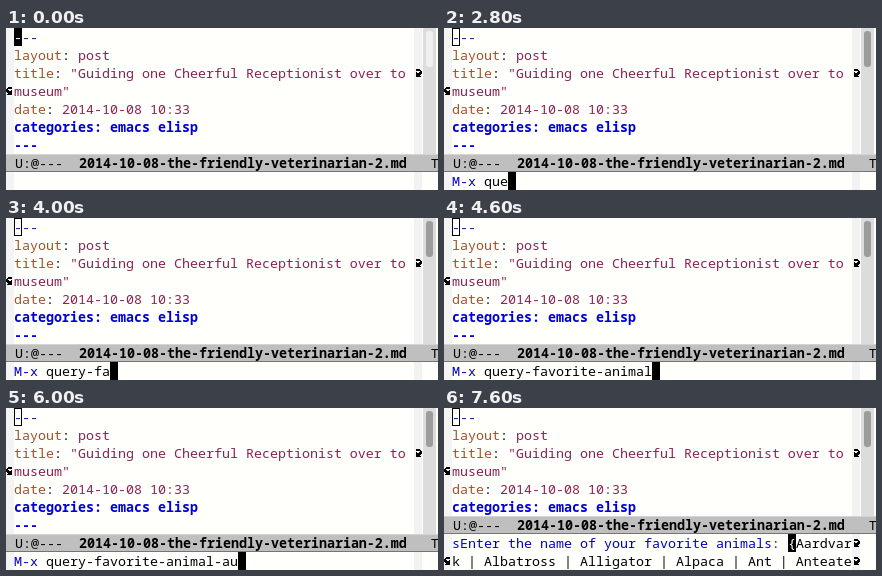
These frames come from a looping animation (432 px wide and 162 px high, 8 s). An HTML page:

```html
<!DOCTYPE html>
<html lang="en">
<head>
<meta charset="utf-8">
<title>Editor command prompt</title>
<style>
  html, body { margin: 0; width: 100%; height: 100%; overflow: hidden; background: #fff; }
  #stage {
    position: relative; width: 432px; height: 162px; overflow: hidden; color: #000;
    font: 13.3333px/18px "Noto Sans Mono", "DejaVu Sans Mono", monospace;
    font-variant-ligatures: none;
  }
  /* white paper with a grey fringe on either side */
  #stage, #panel {
    background: linear-gradient(90deg, #f4f4f4 8px, #fffffc 8px 408px, #f2f2f2 408px 416px, #fffffc 416px);
  }
  #stage > *, .row, svg { position: absolute; }
  .row { left: 8px; height: 18px; white-space: pre; }
  .track { left: 417px; top: 0; width: 13px; height: 126px; background: #dcdcdc; }
  #thumb { left: 420px; top: 3px; width: 7px; height: 36px; border-radius: 3px; background: #9c9c9c; }
  #thumb.light { background: #f0f0f0; }
  .key { color: #a0522d; }
  .str { color: #8b2252; }
  .head { color: #0000d8; font-weight: bold; }
  .rule { color: #16168c; }
  .prompt { color: #0000cd; }
  .cursor { display: inline-block; width: 8px; height: 18px; background: #000; color: #fff; vertical-align: top; }
  .cursor.hollow { background: none; color: inherit; box-shadow: inset 0 0 0 1px #000; }
  #panel { left: 0; top: 126px; width: 432px; height: 54px; }
  #mode {
    left: 0; width: 432px; box-sizing: border-box; padding-left: 9px; overflow: hidden;
    background: #bfbfbf; box-shadow: inset 0 1px #d4d4d4, inset 0 -1px #757575;
  }
  svg { width: 8px; height: 8px; }
  .back { left: 0; transform: scaleX(-1); }
  .wrap { left: 408px; }
  [hidden] { display: none; }
</style>
</head>
<body>
<div id="stage">
  <div class="track"></div>
  <div id="thumb"></div>

  <div class="row rule" style="top:0"><span id="point" class="cursor">-</span>--</div>
  <div class="row" style="top:18px"><span class="key">layout</span>: <span class="str">post</span></div>
  <div class="row" style="top:36px"><span class="key">title</span>: <span class="str">"Guiding one Cheerful Receptionist over to</span></div>
  <div class="row str" style="top:54px">museum"</div>
  <div class="row" style="top:72px"><span class="key">date</span>: <span class="str">2014-10-08 10:33</span></div>
  <div class="row head" style="top:90px">categories: emacs elisp</div>
  <div class="row head" style="top:108px">---</div>
  <svg class="wrap" style="top:41px"><path id="curl" d="M2 0h4v1h1v1h1v3h-1v1h-1v1h1v1H2V3h1v1h2V3h1V2H2z"/></svg>
  <svg class="back" style="top:59px"><use href="#curl"/></svg>

  <div id="panel">
    <div id="mode" class="row">U:@---  <b>2014-10-08-the-friendly-veterinarian-2.md</b>   T</div>
    <div id="command" class="row" style="top:18px"><span class="prompt">M-x </span><span id="typed"></span><span class="cursor"></span></div>
    <div id="question">
      <div class="row" style="top:18px"><span class="prompt">sEnter the name of your favorite animals: </span><span class="cursor">{</span>Aardvar</div>
      <div class="row" style="top:36px">k | Albatross | Alligator | Alpaca | Ant | Anteate</div>
      <svg class="wrap" style="top:23px"><use href="#curl"/></svg>
      <svg class="wrap" style="top:41px"><use href="#curl"/></svg>
      <svg class="back" style="top:41px"><use href="#curl"/></svg>
    </div>
  </div>
</div>
<script>
  const LOOP = 8000, OPEN = 2000, ASK = 7600;
  const COMMAND = "query-favorite-animal-autocomplete";
  // [time in ms, characters typed]
  const KEYS = [
    [2400, 1], [2600, 2], [2800, 3], [3000, 4], [3200, 5], [3400, 6], [3600, 7],
    [4000, 8], [4200, 9], [4400, 10], [4600, 21], [5400, 22], [5800, 23],
    [6000, 24], [6200, 25], [6800, COMMAND.length]
  ];
  const $ = id => document.getElementById(id);
  const [thumb, point, panel, command, typed, question] =
    ["thumb", "point", "panel", "command", "typed", "question"].map($);

  function draw(t) {
    const asking = t >= ASK;
    const count = KEYS.reduce((n, [at, chars]) => t >= at ? chars : n, 0);
    thumb.classList.toggle("light", t < 200);
    point.classList.toggle("hollow", t >= OPEN);
    typed.textContent = COMMAND.slice(0, count);
    command.hidden = t < OPEN || asking;
    question.hidden = !asking;
    panel.style.top = asking ? "108px" : "126px";
  }

  const start = performance.now();
  function tick() {
    draw((performance.now() - start) % LOOP);
    requestAnimationFrame(tick);
  }
  draw(0);
  requestAnimationFrame(tick);
</script>
</body>
</html>
```
